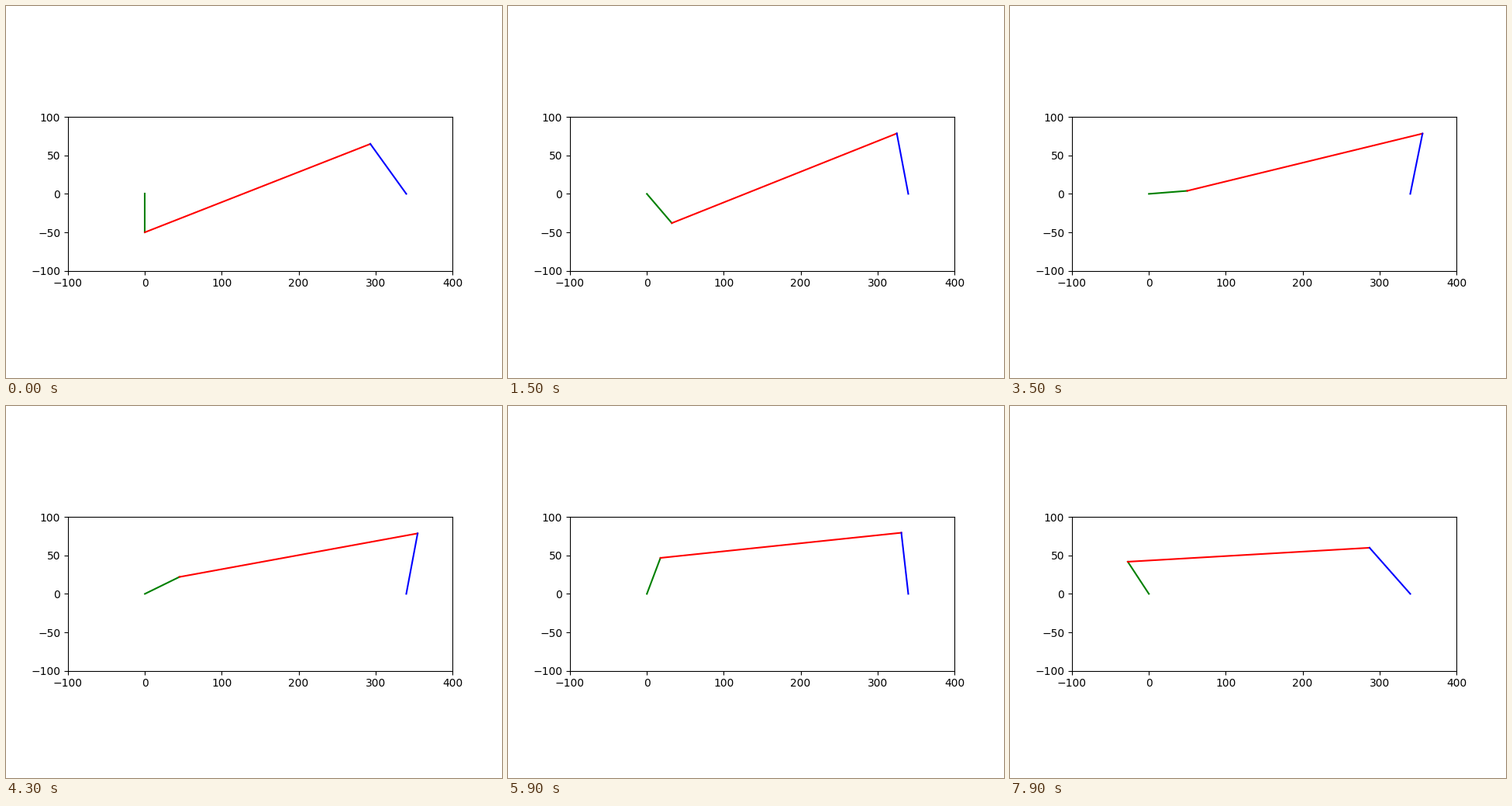
Write a matplotlib script that moves like this. It is 640 px wide and 480 px high and loops after 8000 ms.

```python
import numpy as np
import matplotlib.pyplot as plt
from matplotlib.animation import FuncAnimation

CRANK, COUPLER, ROCKER, BASE = 50, 315, 80, 340
START, STEP = -90, 2.7  # crank angle in degrees
FRAMES, INTERVAL = 80, 100

O = np.array([0.0, 0.0])
C = np.array([float(BASE), 0.0])


def joints(i):
    """Crank pin and rocker pin of the four-bar linkage."""
    a = np.radians(START + STEP * i)
    pin = CRANK * np.array([np.cos(a), np.sin(a)])
    span = C - pin
    d = np.hypot(*span)
    u = span / d
    along = (COUPLER**2 - ROCKER**2 + d**2) / (2 * d)
    up = np.sqrt(COUPLER**2 - along**2)
    return pin, pin + along * u + up * np.array([-u[1], u[0]])


fig, ax = plt.subplots(figsize=(6.4, 4.8), dpi=100)
ax.set_aspect("equal")
ax.set_xlim(-100, 400)
ax.set_ylim(-100, 100)
ax.set_yticks(range(-100, 101, 50))

bars = [ax.plot([], [], color=c, lw=1.5)[0] for c in ("green", "red", "blue")]


def update(i):
    pin, tip = joints(i)
    for bar, (p, q) in zip(bars, ((O, pin), (pin, tip), (tip, C))):
        bar.set_data([p[0], q[0]], [p[1], q[1]])
    return bars


anim = FuncAnimation(fig, update, frames=FRAMES, interval=INTERVAL,
                     repeat=True, repeat_delay=0)
plt.show()
```
